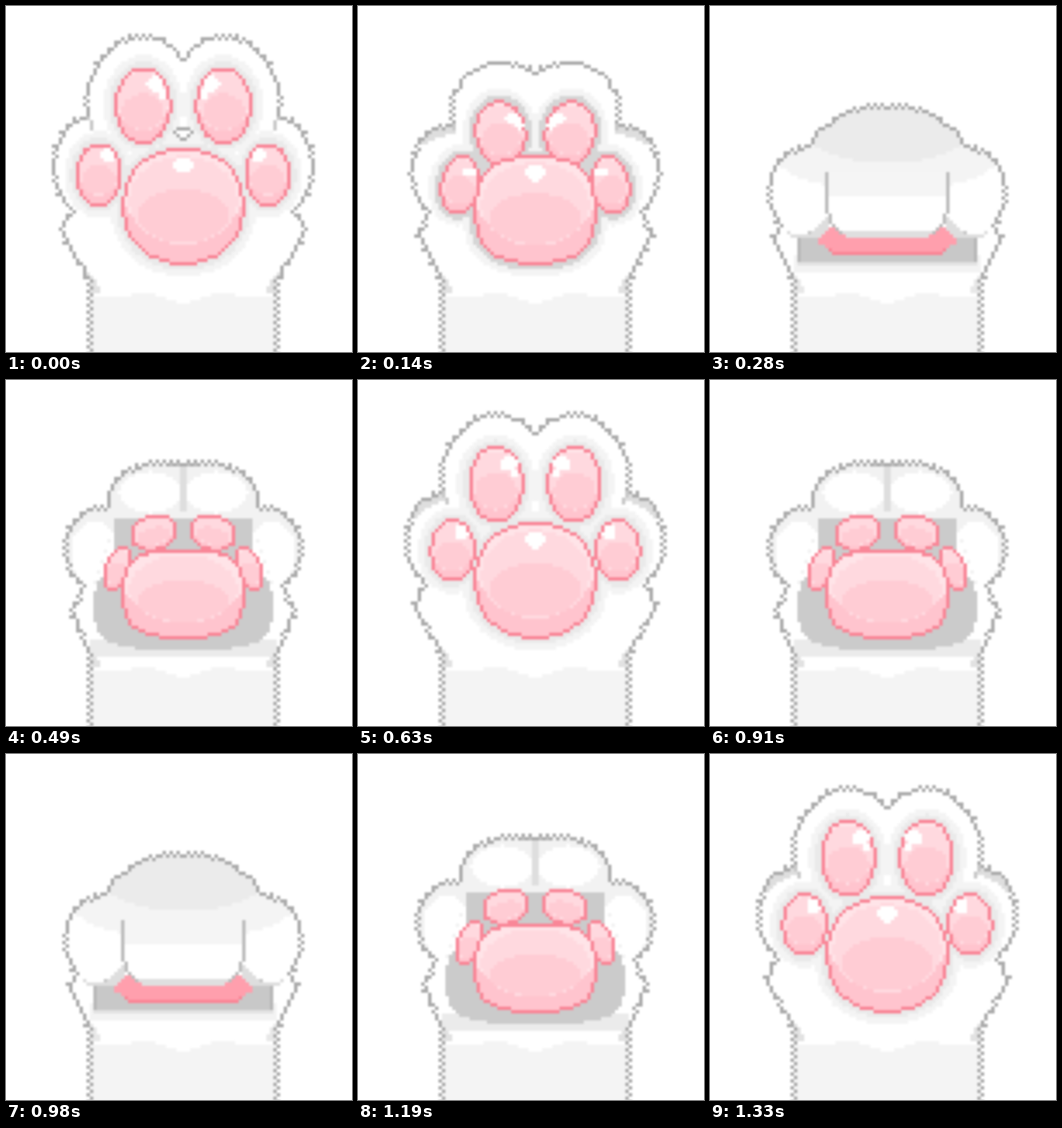
An HTML page with a canvas that plays this animation: 400x400 px, repeating every 1.4 s.

```html
<!DOCTYPE html>
<html>
<head>
<meta charset="utf-8">
<title>Waving cat paw</title>
<style>
html, body { margin: 0; width: 100%; height: 100%; overflow: hidden; background: #fff; }
canvas { display: block; width: 100vmin; height: 100vmin; }
</style>
</head>
<body>
<canvas id="stage" width="400" height="400"></canvas>
<script>
const CELL = 4, GRID = 102, CENTER = 204, STEP = 70;
const ctx = document.getElementById('stage').getContext('2d');
const mix = (a, b, t) => a + (b - a) * t;
const mixAll = (a, b, t) => a.map((v, i) => mix(v, b[i], t));

// Shapes are tests on (distance from the mirror axis, y).
const ellipse = (cx, cy, rx, ry, rot = 0, n = 2) => (x, y) => {
  const dx = Math.abs(x) - cx, dy = y - cy, c = Math.cos(rot), s = Math.sin(rot);
  return Math.abs((dx * c + dy * s) / rx) ** n + Math.abs((dy * c - dx * s) / ry) ** n <= 1;
};
const box = (x0, y0, x1, y1) => (x, y) => Math.abs(x) >= x0 && Math.abs(x) <= x1 && y >= y0 && y <= y1;
const slope = (x0, y0, x1, y1) => (x, y) =>
  y >= y0 && y <= y1 && Math.abs(x) <= mix(x0, x1, (y - y0) / (y1 - y0));
const all = (...shapes) => (x, y) => shapes.every(s => s(x, y));
const any = (...shapes) => (x, y) => shapes.some(s => s(x, y));
const not = shape => (x, y) => !shape(x, y);
const furry = shape => (x, y) =>
  shape(x + ((y >> 2) & 1 ? 1.5 : -1.5), y + ((x >> 2) & 1 ? 1.5 : -1.5));
const rim = shape => (x, y) => shape(x, y) &&
  !(shape(x - CELL, y) && shape(x + CELL, y) && shape(x, y - CELL) && shape(x, y + CELL));

// Lobes are ellipses; the wrist bulge is its upper corner and widest point.
const OPEN = { inner: [51, 104, 61, 72, -0.3], outer: [105, 186, 47, 60], bulge: [132, 238, 144, 260] };
const HALF = { inner: [24, 140, 64, 47, 0], outer: [98, 195, 40, 49], bulge: [117, 242, 131, 268] };
const FIST = { inner: [0, 190, 100, 77], outer: [94, 216, 44, 54], bulge: [124, 254, 134, 268] };

const bodyOf = ({ inner, outer, bulge: [x0, y0, x1, y1] }) => any(
  ellipse(...inner), ellipse(...outer), box(0, 150, 85, 320),
  slope(x0, y0, x1, y1), slope(x1, y1, 110, 318), box(0, 318, 110, 420));
const arm = (x, y) => y > 339 + 4 * Math.cos(x / 14) - x * 0.06;
const wristShade = all(box(96, 298, 118, 332), (x, y) => y - 298 > (116 - x) * 1.4);

function painter(g, clip) {
  return (shape, color) => {
    g.fillStyle = color;
    for (let j = 0; j < GRID; j++) for (let i = 0; i < GRID; i++) {
      const x = Math.abs((i + 0.5) * CELL - CENTER), y = (j + 0.5) * CELL;
      if (clip(x, y) && shape(x, y)) g.fillRect(i, j, 1, 1);
    }
  };
}

function drawPad(paint, [cx, cy, rx, ry, rot, n]) {
  const whole = ellipse(cx, cy, rx, ry, rot, n);
  const within = (dy, kx, ky, color) =>
    paint(all(whole, ellipse(cx, cy + ry * dy, rx * kx, ry * ky, rot)), color);
  paint(whole, '#ffc4ce');
  within(-0.25, 0.98, 0.8, '#ffe4e8');
  within(-0.1, 0.88, 0.76, '#ffd9df');
  within(0.16, 0.74, 0.46, '#ffccd4');
  paint(rim(whole), '#f98798');
}

function drawPalm(paint, pose, t) {
  const late = t * t;
  const toe = [mix(46.5, 34, t), mix(115, 177, t), mix(33, 28, t), mix(45, 21, late), 0.25 * t, 2];
  const side = [mix(97.5, 77, t), mix(195, 218, t), mix(27, 14, late), mix(37, 28, late), -0.35 * t, 2];
  const top = mix(164, 195, late), mid = (top + 299) / 2;
  const pad = [0, mid, 71, 299 - mid, 0, mix(2.15, 3, t)];
  const grown = ([cx, cy, rx, ry, rot, n], by) => ellipse(cx, cy, rx + by, ry + by, rot, n);
  const pads = [toe, side, pad];
  const outer = ellipse(...pose.outer);

  paint(wristShade, '#e2e2e2');
  if (t === 1) {
    const [ox, oy, orx, ory] = pose.outer;
    paint(box(0, 300, 108, 318), '#ebebeb');
    paint(any(box(0, 152, 80, 240), ellipse(0, 262, 103, 50, 0, 3.5)), '#cbcbcb');
    paint(all(outer, not(box(0, 0, 78, 400)), (x, y) => y < 238 && x > 78 + (y - 165) / 3), '#f2f2f2');
    paint(all(ellipse(ox + 4, oy + 6, orx - 12, ory - 12), (x, y) => x > 80 + (y - 165) / 3), '#fff');
    paint(all(ellipse(...pose.inner), box(0, 90, 82, 158)), '#f2f2f2');
    paint(ellipse(38, 130, 36, 24), '#fff');
    paint(box(0, 96, 3, 150), '#dedede');
    paint(box(0, 92, 14, 100), '#bcbcbc');
  } else {
    const shade = t > 0.3 ? '#d6d6d6' : '#eaeaea';
    if (t > 0) {
      const [ox, oy, orx, ory] = pose.outer;
      paint(all(outer, box(94, 110, 150, 160)), '#dedede');
      paint(ellipse(ox - 2, oy + 9, orx - 1, ory - 4), '#fff');
      paint(ellipse(...pose.inner), '#fff');
    }
    pads.forEach(p => paint(grown(p, 13), '#f4f4f4'));
    pads.forEach(p => paint(grown(p, 6), shade));
    paint(all(rim(ellipse(...pose.inner)), outer, box(90, 110, 120, 142)), '#c8c8c8');
  }
  pads.forEach(p => drawPad(paint, p));
  if (t < 1) {
    const k = 1 - t * 0.6;
    paint(ellipse(toe[0] - 14, toe[1] - 25 * k, 10, 9 * k), '#fff');
    paint(ellipse(toe[0] - 22, toe[1] - 13 * k, 5, 5), '#fff');
    paint(ellipse(side[0] - 10, side[1] - 22 * k, 8, 8 * k), '#fff');
    paint(ellipse(0, top + 20, 11, 10), '#fff');
  }
}

function drawFist(paint, pose, drop) {
  const finger = ellipse(0, 215 + drop, 71, 55, 0, 3.5);
  const lower = box(0, 192 + drop, 80, 300);
  const sideToe = all(ellipse(...pose.outer), box(70, 200, 140, 266 + drop));
  paint(ellipse(0, 172 + drop, 130, 52), '#f4f4f4');
  paint(ellipse(0, 146 + drop, 94, 35), '#ebebeb');
  paint(wristShade, '#e8e8e8');
  paint(box(0, 290, 106, 308), '#f3f3f3');
  paint(box(0, 290, 102, 300), '#e2e2e2');
  paint(box(0, 262, 103, 295), '#c8c8c8');
  paint(box(99, 270, 103, 296), '#b8b8b8');
  paint(all(sideToe, not(ellipse(100, 216 + drop, 36, 48))), '#dedede');
  paint(ellipse(102, 220 + drop, 34, 44), '#fff');
  paint(ellipse(0, 172 + drop, 130, 42), '#f4f4f4');
  paint(ellipse(0, 146 + drop, 94, 35), '#ebebeb');
  if (!drop) {
    const pink = any(slope(66, 257, 81, 272), slope(81, 272, 58, 289));
    paint(pink, '#ff9fad');
    paint(all(rim(pink), box(0, 280, 90, 292)), '#fa8797');
  }
  paint(all(finger, lower), '#fff');
  paint(all(finger, box(0, 192 + drop, 66, 220 + drop)), '#f5f5f5');
  paint(all(finger, box(0, 260 + drop, 66, 300)), '#dfdfdf');
  paint(all(rim(finger), lower, not(box(0, 0, 50, 400))), '#bdbdbd');
}

function renderPose(pose, detail) {
  const small = document.createElement('canvas'), large = document.createElement('canvas');
  small.width = small.height = GRID;
  large.width = large.height = 400;
  const body = furry(bodyOf(pose));
  const paint = painter(small.getContext('2d'), body);
  paint(body, '#fff');
  paint(arm, '#f4f4f4');
  detail(paint);
  paint(rim(body), '#ababab');
  const g = large.getContext('2d');
  g.fillStyle = '#fff';
  g.fillRect(0, 0, 400, 400);
  g.imageSmoothingEnabled = false;
  g.filter = 'blur(1px)';
  g.drawImage(small, 1, 0, GRID * CELL, GRID * CELL);
  return large;
}

function palmPose(t) {
  const pose = {};
  for (const part in OPEN) pose[part] = mixAll(OPEN[part], HALF[part], t);
  return renderPose(pose, paint => drawPalm(paint, pose, t));
}

function fistPose(drop) {
  const lowered = ([x, y, ...rest]) => [x, y + drop, ...rest];
  const pose = { inner: lowered(FIST.inner), outer: lowered(FIST.outer), bulge: FIST.bulge };
  return renderPose(pose, paint => drawFist(paint, pose, drop));
}

const poses = [palmPose(0), palmPose(0.09), palmPose(0.52), palmPose(1), fistPose(0), fistPose(8)];
const last = poses.length - 1;

let start;
function frame(now) {
  start ??= now;
  const step = Math.floor((now - start) / STEP + 1e-6) % (2 * last);
  ctx.drawImage(poses[last - Math.abs(last - step)], 0, 0);
  requestAnimationFrame(frame);
}
ctx.drawImage(poses[0], 0, 0);
requestAnimationFrame(frame);
</script>
</body>
</html>
```
